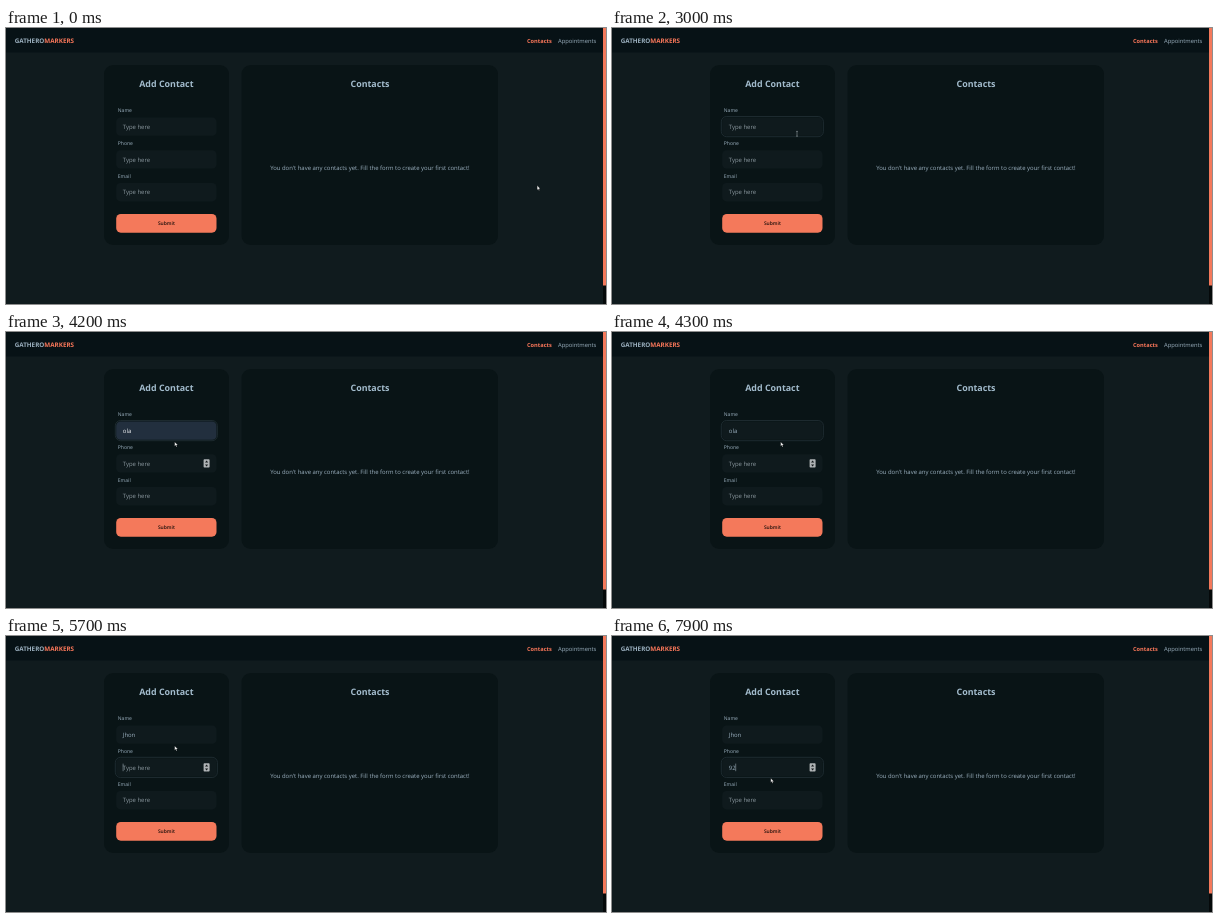
An HTML page that plays this animation: 600x276 px, repeating every 8 s.

```html
<!DOCTYPE html>
<html lang="en">
<head>
<meta charset="utf-8">
<title>Contact form</title>
<style>
  html, body { margin: 0; width: 100%; height: 100%; overflow: hidden; background: #101b1e; }
  svg { display: block; width: 600px; height: 276px; }
  text {
    font-family: "Open Sans", "Noto Sans", sans-serif;
    font-size: 5.94px; fill: #9cb1c0;
    text-rendering: geometricPrecision; white-space: pre;
  }
  .bold { font-weight: 700; }
  .title { font-size: 8.9px; font-weight: 700; text-anchor: middle; fill: #a3bccd; }
  .label { font-size: 5.05px; }
  .accent { fill: #f9775a; }
  .card { fill: #091416; }
  .field { fill: #0f1a1d; }
  .ring { fill: none; stroke: #202d33; stroke-width: .9; }
  .hint { fill: #8b989f; }
  .caret { fill: #b4c4ce; }
</style>
</head>
<body>
<svg viewBox="0 0 600 276">
  <rect width="600" height="276" fill="#101b1e"/>
  <rect width="597" height="24.5" fill="#071216"/>
  <text class="bold" x="8.7" y="14.7" style="font-size:6.3px">GATHERO<tspan class="accent">MARKERS</tspan></text>
  <text class="bold accent" x="521" y="14.6" style="font-size:5.65px">Contacts</text>
  <text x="552" y="14.6" style="font-size:5.8px;font-weight:500">Appointments</text>

  <rect class="card" x="98" y="37" width="125" height="180" rx="9"/>
  <rect class="card" x="235.5" y="37" width="256.5" height="180" rx="9"/>
  <text class="title" x="160.4" y="59.4">Add Contact</text>
  <text class="title" x="364" y="59.4">Contacts</text>
  <text x="363.9" y="142.2" text-anchor="middle">You don't have any contacts yet. Fill the form to create your first contact!</text>

  <g id="form"></g>

  <rect x="110.2" y="186" width="100.3" height="18.7" rx="4.6" fill="#f4795b"/>
  <text x="160.4" y="197.2" text-anchor="middle" style="font-size:4.95px;font-weight:600;fill:#1d0f0b">Submit</text>

  <g id="spinner">
    <rect x="197.6" y="127.2" width="6" height="8.4" rx=".8" fill="#b0b4b6"/>
    <path d="M199 130.4h3.2l-1.6-1.9zM199 132.5h3.2l-1.6 1.9z" fill="#14191b"/>
  </g>

  <rect x="597" width="3" height="276" fill="#05090a"/>
  <rect x="597" width="3" height="257.5" fill="#f4795b"/>

  <g id="mouse">
    <path id="arrow" d="M0 0V4.3L1 3.4L1.7 5L2.4 4.7L1.7 3.2H3Z" fill="#fff" stroke="#000" stroke-width=".25"/>
    <path id="beam" d="M-1 -2.4H1M0 -2.4V2.4M-1 2.4H1" fill="none" stroke="#8d979b" stroke-width=".6"/>
  </g>
</svg>
<script>
const LOOP = 8000;
const $ = id => document.getElementById(id);

function add(parent, tag, attrs) {
  const el = document.createElementNS("http://www.w3.org/2000/svg", tag);
  for (const key in attrs) el.setAttribute(key, attrs[key]);
  return parent.appendChild(el);
}

function makeField(label, y) {
  const form = $("form");
  add(form, "text", { class: "label", x: 111.8, y: y - 5.3 }).textContent = label;
  const box = add(form, "rect", { class: "field", x: 110.2, y, width: 100.3, height: 18.4, rx: 4.4 });
  const ring = add(form, "rect", { class: "ring", x: 109.3, y: y - .9, width: 102.1, height: 20.2, rx: 5.3 });
  const text = add(form, "text", { x: 116.8, y: y + 11.4 });
  const caret = add(form, "rect", { class: "caret", y: y + 5.4, width: .5, height: 7.6 });
  return { box, ring, text, caret };
}

const fields = [["Name", 89.4], ["Phone", 122.2], ["Email", 155]].map(f => makeField(...f));

// Each track holds [start time, value] pairs; a value lasts until the next start.
const tracks = {
  mouse: [[0, [531.2, 157.6]], [2600, [372, 134]], [2700, [214, 109]], [2800, [185, 105.8]],
    [3300, [181, 108]], [3400, [174, 110.5]], [3500, [168.7, 109.9]],
    [7400, [158.8, 116.3]], [7900, [158.8, 142.2]]],
  beam: [[0, false], [2800, true], [3400, false]],
  focus: [[0, -1], [2800, 0], [5700, 1]],
  caret: [[0, false], [2800, true], [3000, false], [3300, true], [3500, false], [3800, true],
    [4200, false], [4400, true], [4800, false], [5000, true], [6000, false], [6200, true],
    [6600, false], [6900, true], [7200, false], [7400, true], [7700, false], [7900, true]],
  name: [[0, ""], [3800, "o"], [4000, "ola"], [4400, ""], [5000, "J"], [5200, "Jh"], [5400, "Jhon"]],
  phone: [[0, ""], [6200, "9"], [6400, "92"]],
  preview: [[0, false], [4200, true], [4300, false]],
  spinner: [[0, false], [3500, true], [4400, false], [5700, true]]
};

const at = (track, t) => tracks[track].findLast(([start]) => start <= t)[1];
const show = (el, on) => el.setAttribute("visibility", on ? "visible" : "hidden");

function draw(now) {
  const t = now % LOOP;
  const values = [at("name", t), at("phone", t), ""];
  const focus = at("focus", t);
  const preview = at("preview", t);

  fields.forEach(({ box, ring, text, caret }, i) => {
    const value = values[i];
    const filled = preview && i === 0;
    const shown = value || "Type here";
    if (text.textContent !== shown) text.textContent = shown;
    text.setAttribute("class", value ? "" : "hint");
    text.style.fill = filled ? "#f2f5f7" : "";
    box.style.fill = filled ? "#222f3e" : "";
    show(ring, focus === i);
    show(caret, focus === i && at("caret", t));
    caret.setAttribute("x", 116.8 + (value ? text.getComputedTextLength() : 0));
  });

  const [x, y] = at("mouse", t);
  const beam = at("beam", t);
  $("mouse").setAttribute("transform", `translate(${x} ${y})`);
  show($("arrow"), !beam);
  show($("beam"), beam);
  show($("spinner"), at("spinner", t));
}

function tick() {
  draw(performance.now());
  requestAnimationFrame(tick);
}
tick();
</script>
</body>
</html>
```
